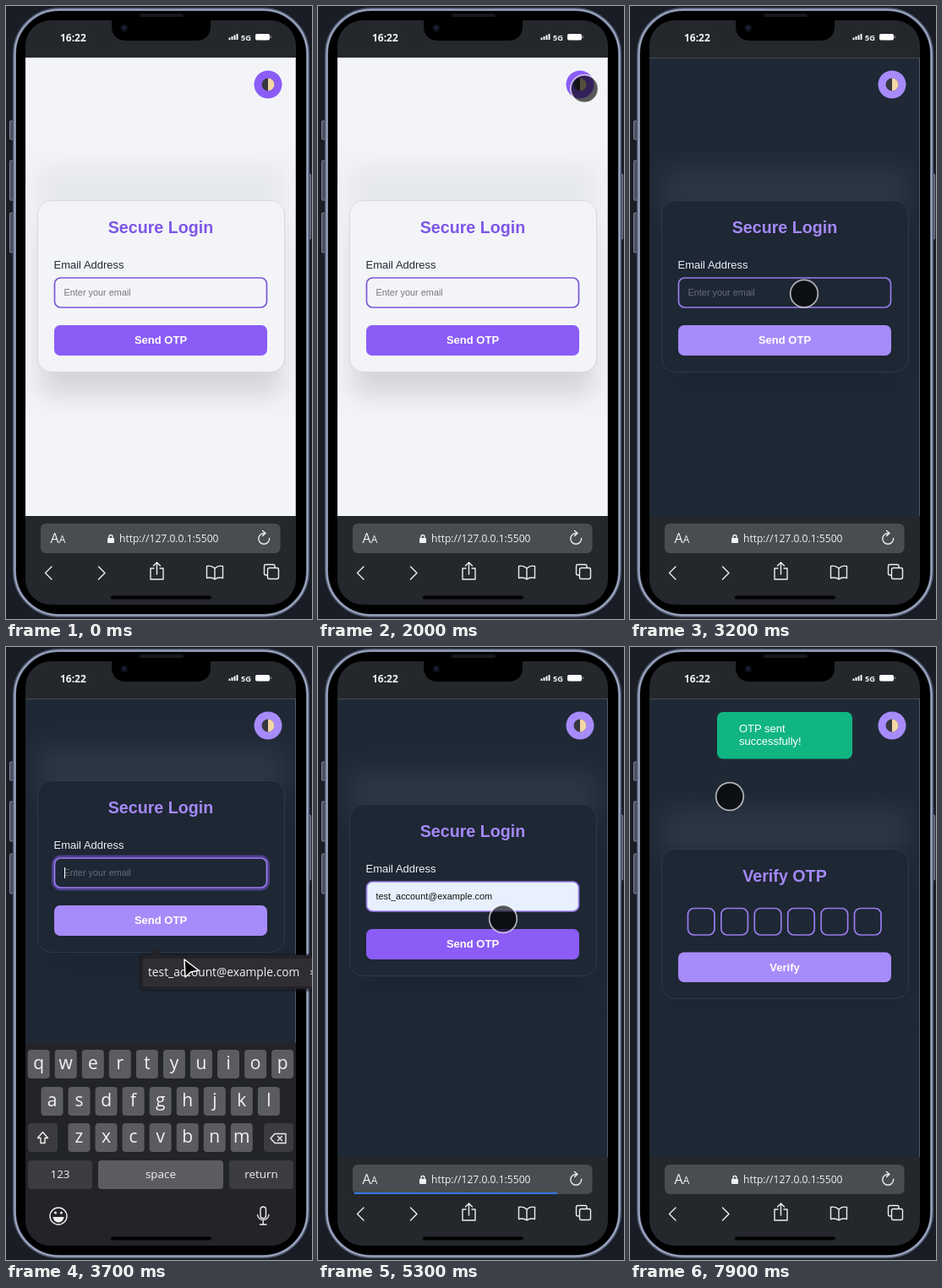
Animation, 362 px wide and 726 px high, one loop 8000 ms. Source, as an HTML page:

```html
<!DOCTYPE html>
<html lang="en">
<head>
<meta charset="utf-8">
<title>Login with one-time code</title>
<style>
html, body { margin: 0; width: 100%; height: 100%; overflow: hidden; background: #1a1d25; }
svg { display: block; width: 100vw; height: 100vh; }
text { font-family: "Liberation Sans", Arial, sans-serif; font-size: 13px; }
.ui { font-family: "Open Sans", "Noto Sans", sans-serif; fill: #f2f2f3; }
.mid { text-anchor: middle; }
.bold { font-weight: bold; }
.title { font-size: 19.7px; fill: var(--title); }
.small { font-size: 10.9px; }
.line { fill: none; stroke: #eee; stroke-width: 1.4; stroke-linecap: round; stroke-linejoin: round; }
.card { fill: var(--card); stroke: var(--edge); }
.field { fill: none; stroke: var(--field); stroke-width: 1.7; }
.accent { fill: var(--accent); }
.soft { filter: blur(15px); }
</style>
</head>
<body>
<svg viewBox="0 0 362 726">
  <defs>
    <clipPath id="screen"><rect x="23" y="17" width="320" height="692" rx="30"/></clipPath>
    <clipPath id="page"><rect x="23" y="61" width="320" height="543"/></clipPath>
  </defs>

  <!-- phone body -->
  <rect width="362" height="726" fill="#1a1d25"/>
  <g fill="#4b5062" stroke="#9299ae" stroke-width=".8">
    <rect x="4.5" y="136" width="4" height="22" rx="1"/>
    <rect x="4.5" y="183" width="4" height="47" rx="1"/>
    <rect x="4.5" y="245" width="4" height="47" rx="1"/>
    <rect x="357.5" y="199" width="3" height="77" rx="1"/>
  </g>
  <rect x="10" y="4" width="347" height="718" rx="53" fill="#000" stroke="#59627a" stroke-width="4"/>
  <rect x="10.5" y="4.5" width="346" height="717" rx="52" fill="none" stroke="#a9b3cb" stroke-width="1.6"/>
  <rect x="158" y="9" width="52" height="4" rx="2" fill="#17181b"/>

  <g clip-path="url(#screen)">
    <rect x="23" y="17" width="320" height="692" fill="#24272c"/>

    <g clip-path="url(#page)">
      <rect x="23" y="61" width="320" height="543" style="fill:var(--page)"/>
      <path d="M23 61.2H342.5V604" fill="none" stroke="#8a8784" stroke-opacity=".5"/>
      <g id="login">
        <rect class="soft" x="37" y="190" width="293" height="60" fill="#8a94a8" opacity=".12"/>
        <rect class="soft" x="42" y="260" width="283" height="200" style="fill:var(--shade)"/>
        <rect class="card" x="37.5" y="230.5" width="292" height="203" rx="16"/>
        <text class="title bold mid" x="183" y="269">Secure Login</text>
        <text x="56.5" y="311" style="fill:var(--label)">Email Address</text>
        <rect id="glow" x="56" y="320.5" width="254" height="38" rx="9" fill="none" stroke="#8b5cf6" stroke-opacity=".45" stroke-width="4"/>
        <rect id="input" class="field" x="57.5" y="322" width="251" height="35" rx="7"/>
        <text id="hint" class="small" x="68.5" y="343" style="fill:var(--hint)">Enter your email</text>
        <text id="email" class="small" x="68.5" y="343" fill="#111">test_account@example.com</text>
        <path id="caret" d="M69.5 333V346" stroke="#fff"/>
        <rect id="send" class="accent" x="57" y="378" width="252" height="36" rx="7"/>
        <text class="bold mid" x="183" y="400" fill="#fff">Send OTP</text>
      </g>
      <g id="verify">
        <rect class="soft" x="37" y="190" width="293" height="60" fill="#8a94a8" opacity=".12"/>
        <rect class="soft" x="42" y="262" width="283" height="170" style="fill:var(--shade)"/>
        <rect class="card" x="37.5" y="239.5" width="292" height="177" rx="16"/>
        <text class="title bold mid" x="183" y="278">Verify OTP</text>
        <g id="digits"></g>
        <rect class="accent" x="57" y="361.5" width="252" height="35.5" rx="7"/>
        <text class="bold mid" x="183" y="384" fill="#fff">Verify</text>
      </g>
      <circle class="accent" cx="310" cy="93" r="16.5"/>
      <circle cx="310" cy="93" r="7.5" fill="#39383f"/>
      <path d="M310 85.5a7.5 7.5 0 0 1 0 15z" fill="#f3d7a6"/>
      <g id="toast">
        <rect x="103" y="77" width="160" height="55.5" rx="7" fill="#10b582"/>
        <text x="129" y="101" fill="#fff">OTP sent</text>
        <text x="129" y="116" fill="#fff">successfully!</text>
      </g>
    </g>

    <!-- browser bar -->
    <rect x="41" y="613" width="283.5" height="35" rx="6" fill="#494c50"/>
    <path id="load" stroke="#3478f6" stroke-width="2"/>
    <text class="ui" x="52.5" y="636" style="font-size:16px">A<tspan font-size="12">A</tspan></text>
    <rect x="120" y="630" width="8" height="6" rx="1" fill="#f2f2f3"/>
    <path class="line" d="M122 630v-1.5a2 2 0 0 1 4 0V630"/>
    <text class="ui" x="134" y="635" style="font-size:12.1px">http://127.0.0.1:5500</text>
    <path class="line" d="M306 624.5a6.4 6.4 0 1 0 5.6 6M303.500 621.500l3.500 3-3.500 3"/>
    <path class="line" d="M54 664l-7.500 7.500 7.500 7.500M109.500 664l7.500 7.500-7.500 7.500"/>
    <path class="line" d="M175 666h-4v13h15v-13h-4M178.500 673v-14M174.500 663l4-4 4 4"/>
    <path class="line" d="M247 666q-4-4-9.500-2.500v14q5.500-1.500 9.500 1.500 4-3 9.500-1.500v-14q-5.500-1.500-9.500 2.500v13"/>
    <path class="line" d="M309 674h-1.500q-2 0-2-2v-8.500q0-2 2-2h8.500q2 0 2 2v1.500"/>
    <rect class="line" x="309.500" y="665.500" width="13" height="13" rx="2"/>

    <g id="keyboard">
      <rect x="23" y="469" width="320" height="241" fill="#222428"/>
      <g id="keys"></g>
      <path class="line" d="M43.500 574.500l-6 7h3.500v6h5v-6h3.500z"/>
      <path class="line" d="M313 582l5-5.500h13v11h-13zM321.500 579.500l5 5m0-5l-5 5"/>
      <circle class="line" cx="62" cy="674" r="10"/>
      <path d="M55.500 675h13a6.500 6.500 0 0 1-13 0z" fill="#eee"/>
      <circle cx="58.500" cy="670" r="1.600" fill="#eee"/>
      <circle cx="65.500" cy="670" r="1.600" fill="#eee"/>
      <rect class="line" x="301" y="663" width="6.500" height="13.500" rx="3.250"/>
      <path class="line" d="M297.500 672.500a6.800 6.800 0 0 0 13.500 0M304.250 680v4M300.500 684h7.500"/>
    </g>
    <rect x="124" y="698.5" width="119" height="4" rx="2" fill="#000"/>

    <!-- status bar -->
    <path d="M125 16V23Q125 41 143 41H224Q242 41 242 23V16z" fill="#000"/>
    <circle cx="140" cy="26" r="4" fill="#10131d"/>
    <circle cx="139.500" cy="25.500" r="1.300" fill="#29344f"/>
    <text class="ui bold" x="64" y="42" style="font-size:12px">16:22</text>
    <path d="M264.500 40v-2.500M267.500 40v-4M270.500 40v-5.500M273.500 40v-7" stroke="#fff" stroke-width="1.900"/>
    <text class="ui bold" x="278" y="40.500" style="font-size:9.300px">5G</text>
    <rect x="295" y="33" width="17" height="7.500" rx="2" fill="#fff"/>
    <rect x="312.700" y="35.500" width="1" height="2.500" fill="#aaa"/>

    <circle id="dot" r="16.300" fill="#000" fill-opacity=".64" stroke="#fff" stroke-opacity=".65" stroke-width="1.800"/>
  </g>

  <g id="popup">
    <rect x="157" y="363" width="220" height="45" rx="6" fill="#15161a" opacity=".45"/>
    <path d="M168 365l9-8 9 8H370V405H164q-5 0-5-5V370q0-5 5-5z" fill="#232226"/>
    <rect x="162" y="369" width="208" height="33" rx="4" fill="#302d33"/>
    <text class="ui" x="168" y="390" style="font-size:13.750px">test_account@example.com</text>
    <text class="ui" x="359" y="390">×</text>
  </g>
  <path id="arrow" d="M0 0L1 21 7.500 15 17 13z" fill="#000" stroke="#fff" stroke-width="1.500" stroke-linejoin="round"/>
</svg>
<script>
const $ = id => document.getElementById(id);
const show = (id, on) => $(id).style.display = on ? '' : 'none';
const shift = (id, x, y) => $(id).setAttribute('transform', `translate(${x} ${y})`);
const during = (t, from, to) => t >= from && t < to;

// Linear interpolation over rows of [time, ...values]
function track(t, rows) {
  const next = rows.findIndex(r => r[0] > t);
  if (next === 0) return rows[0].slice(1);
  if (next < 0) return rows.at(-1).slice(1);
  const a = rows[next - 1], b = rows[next], k = (t - a[0]) / (b[0] - a[0]);
  return a.slice(1).map((v, i) => v + (b[i + 1] - v) * k);
}

// name: [light, dark], each r, g, b, alpha
const theme = {
  page: [[243, 244, 248, 1], [31, 41, 54, 1]],
  card: [[243, 244, 248, 1], [30, 39, 52, 1]],
  edge: [[214, 215, 224, 1], [47, 56, 72, 1]],
  shade: [[0, 0, 0, .13], [20, 28, 42, .25]],
  title: [[126, 87, 230, 1], [164, 137, 246, 1]],
  label: [[36, 40, 54, 1], [238, 240, 245, 1]],
  hint: [[120, 120, 126, 1], [104, 110, 122, 1]],
  field: [[126, 87, 214, 1], [153, 124, 235, 1]],
  accent: [[139, 92, 246, 1], [167, 139, 250, 1]]
};
const path = [
  [1500, 362, 130], [1900, 315, 98], [2600, 316, 98], [3100, 206, 340], [3400, 206, 342],
  [3700, 211, 370], [3900, 213, 382], [4100, 213, 382], [4700, 219, 322],
  [5500, 219, 322], [6400, 142, 373], [6800, 142, 373], [7600, 118, 177]
];
const lift = [[3350, 0], [3600, -72], [5100, -72], [5300, -44], [5600, -4]];
const slide = [[3350, 241], [3600, 0], [5050, 0], [5250, 241]];

function key(x, y, w, label, fill = '#5b5c5f', size = 21) {
  return `<rect x="${x}" y="${y}" width="${w}" height="34" rx="4" fill="${fill}"/>
    <text class="ui mid" x="${x + w / 2}" y="${y + (size > 20 ? 23 : 21)}" style="font-size:${size}px">${label}</text>`;
}
const dark = '#3b3c3f';
$('keys').innerHTML =
  [['qwertyuiop', 25.7, 477], ['asdfghjkl', 41.5, 521], ['zxcvbnm', 73.5, 564]]
    .map(([row, x, y]) => [...row].map((c, i) => key(x + i * 32.05, y, 26, c)).join('')).join('') +
  key(26, 564, 35, '', dark) + key(305, 564, 35, '', dark) +
  key(26, 608, 76, '123', dark, 13.5) + key(109, 608, 148, 'space', '#5b5c5f', 13.5) +
  key(264, 608, 76, 'return', dark, 13.5);
$('digits').innerHTML = Array.from({ length: 6 }, (_, i) =>
  `<rect class="field" x="${68.5 + i * 39.4}" y="309.500" width="31.500" height="31.500" rx="7"/>`).join('');

function draw(t) {
  const [night] = track(t, [[2050, 0], [2300, 1]]);
  for (const name in theme) {
    const [a, b] = theme[name];
    const mix = a.map((v, i) => v + (b[i] - v) * night);
    document.documentElement.style.setProperty('--' + name, `rgba(${mix})`);
  }

  const filled = t >= 4100, sent = t >= 7300;
  shift('login', 0, track(t, lift)[0]);
  shift('keyboard', 0, track(t, slide)[0]);
  show('keyboard', during(t, 3350, 5250));
  show('glow', during(t, 3300, 5100));
  show('caret', during(t, 3400, 4100) && Math.floor((t - 3400) / 500) % 2 === 0);
  show('hint', !filled);
  show('email', filled);
  $('input').style.fill = filled ? '#e8f0fe' : 'none';
  $('send').style.fill = during(t, 4700, 5600) ? '#8b5cf6' : '';
  show('login', !sent);
  show('verify', sent);
  $('toast').style.opacity = track(t, [[7200, 0], [7500, 1]])[0];

  show('load', during(t, 5100, 5500));
  $('load').setAttribute('d', `M43 647H${track(t, [[5100, 43], [5300, 283], [5400, 322]])[0]}`);

  const [x, y] = track(t, path), overPopup = during(t, 3550, 4100);
  shift('dot', x, y);
  shift('arrow', x, y);
  show('dot', t >= 1500 && !overPopup);
  show('arrow', overPopup);
  show('popup', during(t, 3400, 4100));
}

const start = performance.now();
function tick() {
  const t = (performance.now() - start) % 8000;
  draw(Math.floor(t / 100) * 100);
  requestAnimationFrame(tick);
}
tick();
</script>
</body>
</html>
```
